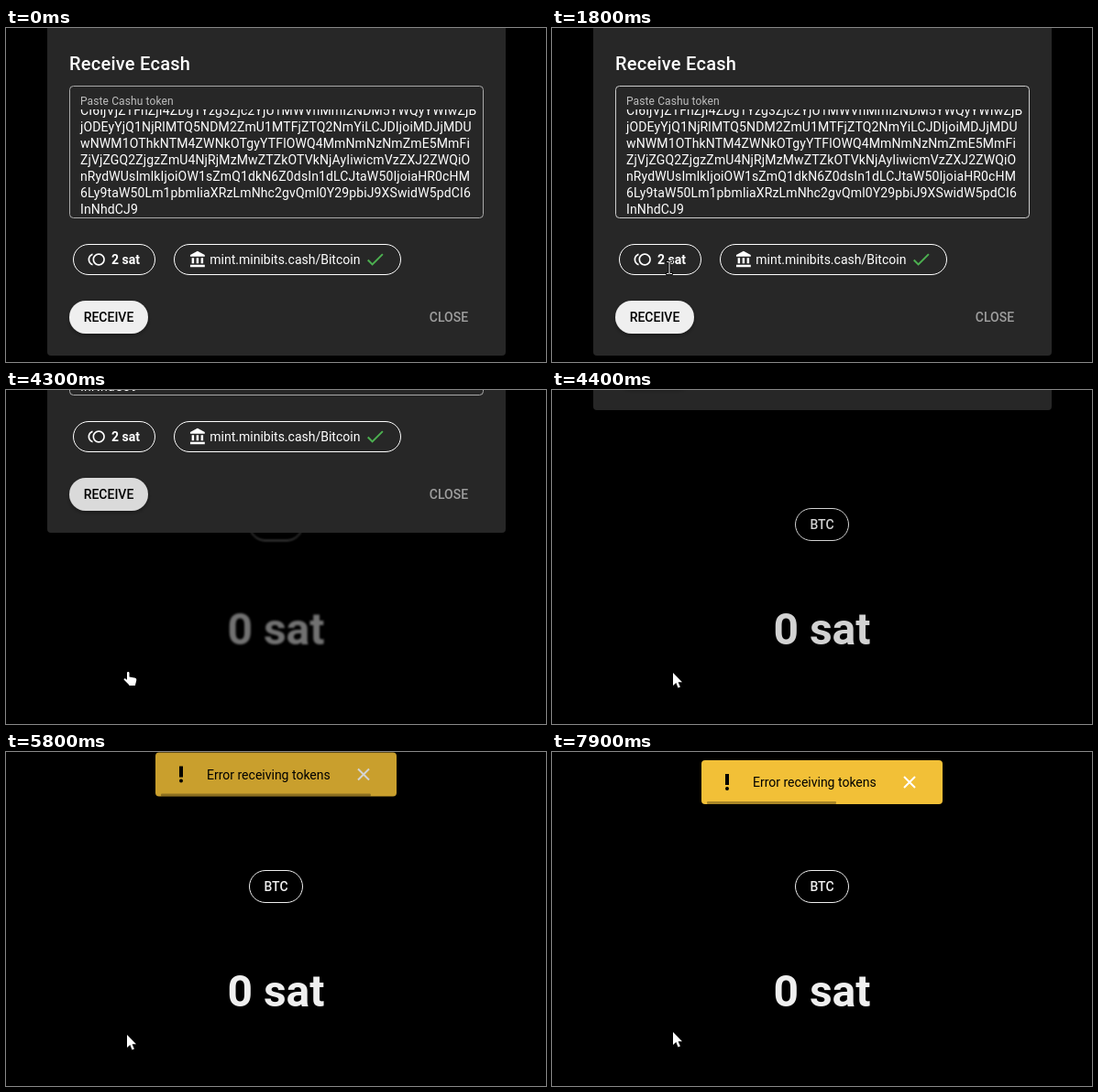
Animation, 589 px wide and 365 px high, one loop 8 s. Source, as an HTML page:

```html
<!DOCTYPE html>
<html lang="en">
<head>
<meta charset="utf-8">
<title>Receive Ecash</title>
<style>
  html, body { margin: 0; width: 100%; height: 100%; overflow: hidden; background: #000; }
  svg { display: block; width: 589px; height: 365px; font: 14px Roboto, sans-serif; }
  .pill { fill: none; stroke: #fff; }
  .mid { text-anchor: middle; font-weight: 500; }
  .token { letter-spacing: .00937em; }
  .label { font-size: 12px; letter-spacing: .00937em; fill: #bebebe; }
  .title { font-size: 20px; font-weight: 500; letter-spacing: .0125em; }
  .balance { font-size: 48px; font-weight: 700; }
  .outlined { fill: #fff; stroke: #000; stroke-width: 2; stroke-linejoin: round; paint-order: stroke; }
</style>
</head>
<body>
<svg viewBox="0 0 589 365" fill="#fff">
  <defs>
    <clipPath id="lines"><rect x="70" y="89" width="450" height="118"/></clipPath>
    <filter id="shade" x="-20%" y="-30%" width="140%" height="180%">
      <feDropShadow dx="0" dy="2" stdDeviation="2" flood-color="#000" flood-opacity=".35"/>
    </filter>
  </defs>
  <rect width="589" height="365" fill="#000"/>

  <g id="page" fill="#efefef">
    <rect class="pill" x="265.5" y="129.5" width="58" height="35" rx="17.5" style="stroke:#efefef"/>
    <text class="mid" x="294.5" y="152">BTC</text>
    <text class="mid balance" x="294.5" y="278">0 sat</text>
  </g>

  <g id="dialog">
    <rect x="45" y="-20" width="500" height="378" rx="4" fill="#272727"/>
    <text class="title" x="69" y="46">Receive Ecash</text>
    <rect id="field" x="69.5" y="63.5" width="451" height="144" rx="4" fill="none"/>
    <text class="label" x="81" y="84">Paste Cashu token</text>
    <g id="token" class="token" clip-path="url(#lines)"></g>

    <rect class="pill" x="73.5" y="236.5" width="89" height="33" rx="16.5"/>
    <path transform="translate(88.7 243) scale(.8333)" d="M15 4c-4.42 0-8 3.58-8 8s3.58 8 8 8 8-3.58 8-8-3.58-8-8-8zm0 14c-3.31 0-6-2.69-6-6s2.69-6 6-6 6 2.69 6 6-2.69 6-6 6zM3 12c0-2.61 1.67-4.83 4-5.65V4.26C3.55 5.15 1 8.27 1 12s2.55 6.85 6 7.74v-2.09c-2.33-.82-4-3.04-4-5.65z"/>
    <text x="115" y="258" font-weight="700">2 sat</text>

    <rect class="pill" x="183.5" y="236.5" width="247" height="33" rx="16.5"/>
    <path transform="translate(199.3 243) scale(.8333)" d="M4 10v7h3v-7H4zm6 0v7h3v-7h-3zM2 22h19v-3H2v3zm14-12v7h3v-7h-3zm-4.5-9L2 6v2h19V6l-9.5-5z"/>
    <text x="222.3" y="258">mint.minibits.cash/Bitcoin</text>
    <path transform="translate(390.6 240.8)" fill="#4caf50" d="M9 16.17 4.83 12l-1.42 1.41L9 19 21 7l-1.41-1.41z"/>

    <rect id="receive" x="69" y="298" width="86" height="36" rx="18" filter="url(#shade)"/>
    <text class="mid" x="112" y="321" fill="#000">RECEIVE</text>
    <text class="mid" x="483" y="321" fill="#9e9e9e">CLOSE</text>
  </g>

  <g id="toast">
    <rect x="163" y="9" width="263" height="48" rx="4" fill="#f2c037"/>
    <rect id="bar" x="169" y="54" height="3" rx="1" fill="#000" opacity=".3"/>
    <g fill="#000">
      <rect x="189" y="24" width="4" height="12"/>
      <circle cx="191" cy="40" r="2"/>
      <text x="219" y="38">Error receiving tokens</text>
    </g>
    <path d="M384 27l12 12M396 27l-12 12" stroke="#fff" stroke-width="2"/>
  </g>

  <g id="cursor">
    <path id="arrow" class="outlined" d="M0 0V14L3.3 11 5.5 16.5 7.9 15.4 5.6 10.2H10Z"/>
    <path id="hand" class="outlined" transform="translate(-5 -1)" d="M4 2c0-1.5 2.5-1.5 2.5 0v4.5l5.5 1c1.5.3 2.5 1 2.3 2.5l-.8 3.5c-.2.8-.5 1.2-.5 2.5H6.5c-.3-1-1.5-2-2.5-3L.8 9.8c-.8-1 .6-2 1.5-1.3L4 9.8z"/>
    <path id="beam" class="outlined" d="M-3-7h2l1 .7 1-.7h2v1h-2l-.5 .5v11l.5 .5h2v1h-2l-1-.7-1 .7h-2v-1h2l.5-.5v-11l-.5-.5h-2z"/>
  </g>
</svg>

<script>
const LOOP = 8000, STEP = 100;
const $ = id => document.getElementById(id);
const set = (id, attrs) => {
  for (const key in attrs) $(id).setAttribute(key, attrs[key]);
};
const clamp = v => Math.min(1, Math.max(0, v));
const ramp = (t, start, length) => clamp((t - start) / length);
const mix = (a, b, k) => a + (b - a) * k;
const grey = v => `rgb(${v},${v},${v})`;

function bezier(x1, y1, x2, y2) {
  const at = (a, b, s) => 3 * a * s * (1 - s) ** 2 + 3 * b * s * s * (1 - s) + s ** 3;
  return x => {
    if (x <= 0 || x >= 1) return clamp(x);
    let lo = 0, hi = 1;
    for (let i = 0; i < 24; i++) {
      const s = (lo + hi) / 2;
      if (at(x1, x2, s) < x) lo = s; else hi = s;
    }
    return at(y1, y2, lo);
  };
}
const ease = bezier(.25, .1, .25, 1);
const standard = bezier(.4, 0, .2, 1);
const slide = bezier(.215, .61, .355, 1);

const token = [
  'CI6IjVjZTFhZjI4ZDg1Yzg3Zjc2YjU1MWVhMmI2NDM5YWQyYWIwZjB',
  'jODEyYjQ1NjRlMTQ5NDM2ZmU1MTFjZTQ2NmYiLCJDIjoiMDJjMDU',
  'wNWM1OThkNTM4ZWNkOTgyYTFlOWQ4MmNmNzNmZmE5MmFi',
  'ZjVjZGQ2ZjgzZmU4NjRjMzMwZTZkOTVkNjAyIiwicmVzZXJ2ZWQiO',
  'nRydWUsImlkIjoiOW1sZmQ1dkN6Z0dsIn1dLCJtaW50IjoiaHR0cHM',
  '6Ly9taW50Lm1pbmliaXRzLmNhc2gvQml0Y29pbiJ9XSwidW5pdCI6',
  'InNhdCJ9'
];
$('token').innerHTML = token
  .map((line, i) => `<text x="81" y="${95 + 18 * i}">${line}</text>`).join('');

// time, x, y of the pointer on its way to the button
const path = [
  [600, 300, 4], [900, 250, 66], [1400, 170, 160],
  [1700, 136, 212], [1800, 128, 262], [2200, 115, 332]
];

function pointer(t) {
  if (t >= 6700) return [132, 306];
  if (t >= 4400) return [132, 309];
  if (t >= 3200) return [133, 308];
  const i = path.findIndex(p => p[0] > t);
  if (i < 0) return [115, 332];
  if (i === 0) return [-50, -50];
  const [a, b] = [path[i - 1], path[i]];
  const k = ramp(t, a[0], b[0] - a[0]);
  return [mix(a[1], b[1], k), mix(a[2], b[2], k)];
}

function shape(t, y) {
  if (t >= 4400) return 'arrow';
  if (y >= 298) return 'hand';
  return y >= 63 && y < 208 || y >= 245 && y < 264 ? 'beam' : 'arrow';
}

function draw(t) {
  const [x, y] = pointer(t);
  const kind = shape(t, y);
  set('cursor', { transform: `translate(${x} ${y})` });
  for (const id of ['arrow', 'hand', 'beam']) {
    set(id, { visibility: id === kind ? 'visible' : 'hidden' });
  }

  const hover = standard(ramp(t, 880, 360)) - standard(ramp(t, 1660, 360));
  set('field', { stroke: grey(Math.round(mix(169, 255, hover))) });
  set('receive', { fill: grey(Math.round(mix(239, 218, ramp(t, 1950, 250)))) });

  const gone = slide(ramp(t, 4241, 259));
  set('dialog', {
    transform: `translate(0 ${-Math.round(360 * gone)})`,
    visibility: gone < 1 ? 'visible' : 'hidden'
  });
  set('page', { opacity: mix(.36, 1, gone ** 3) });
  $('page').style.filter = gone < 1 ? `blur(${2 * (1 - gone)}px)` : 'none';

  const shown = ease(ramp(t, 5270, 1000));
  set('toast', { opacity: shown, transform: `translate(0 ${-50 * (1 - shown)})` });
  set('bar', { width: 251 * (1 - ramp(t, 5270, 6000)) });
}

const begin = performance.now();
function tick() {
  const t = (performance.now() - begin) % LOOP;
  draw(Math.floor(t / STEP) * STEP);
  requestAnimationFrame(tick);
}
tick();
</script>
</body>
</html>
```
